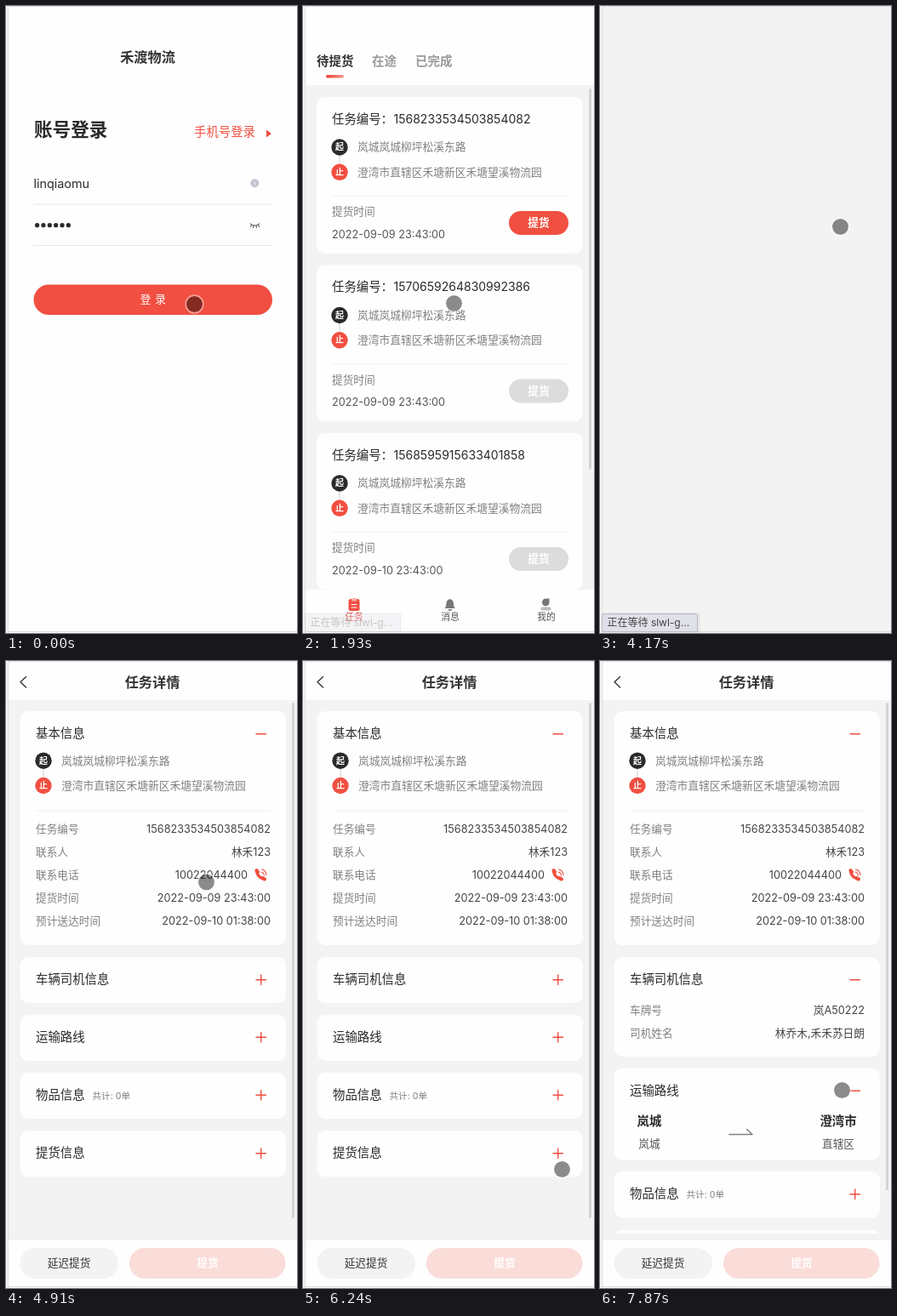
Write an HTML page that moves like this. It is 342 px wide and 737 px high and loops after 8000 ms.

```html
<!DOCTYPE html>
<html lang="zh-CN">
<head>
<meta charset="utf-8">
<style>
html, body { margin: 0; width: 100%; height: 100%; overflow: hidden; background: #fefefe; }
svg { display: block; }
text { font-family: Inter, 'Noto Sans CJK SC', 'Noto Sans CJK', sans-serif; white-space: pre; }
</style>
</head>
<body>
<svg id="stage" width="342" height="737" viewBox="0 0 342 737"></svg>
<script>
const RED = '#f04f41', INK = '#2a2a2a', GREY = '#808080', WHITE = '#fefefe', PAGE = '#f3f3f3';
const FROM = '岚城岚城柳坪松溪东路', TO = '澄湾市直辖区禾塘新区禾塘望溪物流园';

// y is the vertical middle of the glyphs
const text = (x, y, s, size = 12.7, fill = GREY, anchor = 'start', weight = 400) =>
  `<text x="${x}" y="${y + size * .345}" font-size="${size}" fill="${fill}" text-anchor="${anchor}" font-weight="${weight}">${s}</text>`;
const rect = (x, y, w, h, fill, r = 0) =>
  `<rect x="${x}" y="${y}" width="${w}" height="${h}" rx="${r}" fill="${fill}"/>`;
const dot = (x, y, r, fill) => `<circle cx="${x}" cy="${y}" r="${r}" fill="${fill}"/>`;
const line = (d, stroke, w = 1) =>
  `<path d="${d}" fill="none" stroke="${stroke}" stroke-width="${w}" stroke-linecap="round" stroke-linejoin="round"/>`;
const group = (id, s) => `<g id="${id}">${s}</g>`;

const stops = (x, y) =>
  rect(x - .5, y, 1, 29, '#ccc') +
  [['起', INK, FROM], ['止', RED, TO]].map(([mark, fill, place], i) =>
    dot(x, y + i * 29.3, 9.7, fill) +
    text(x, y + i * 29.3, mark, 10, '#fff', 'middle', 700) +
    text(x + 21, y + i * 29.3, place, 12.75)).join('');

function loginPage() {
  let s = rect(0, 0, 342, 737, WHITE) +
    text(166.5, 60, '禾渡物流', 16.2, '#333', 'middle', 700) +
    text(33, 146, '账号登录', 21.6, INK, 'start', 700) +
    text(221, 148.5, '手机号登录', 14.4, RED) +
    `<path d="M306 145.5L312 150L306 154.500Z" fill="${RED}"/>` +
    text(32.5, 209, 'linqiaomu', 14.4, INK) +
    dot(292.3, 208.3, 5, '#c3c4d0') +
    line('M290.8 206.8l3 3m0-3l-3 3', '#eee', .8) +
    rect(32, 232.5, 281, 1, '#e6e6e6') + rect(32, 281, 281, 1, '#e6e6e6') +
    line('M287 256q5.500 4.500 11 0M288.500 257.500l-1 2M291 258.500l-.5 2M294 258.500l.5 2M296.500 257.500l1 2', '#444', 1) +
    rect(32.5, 327.5, 280.5, 35.5, RED, 17.75) +
    text(164, 345, '登', 12.7, '#fff', 'middle') + text(181.5, 345, '录', 12.7, '#fff', 'middle');
  for (let i = 0; i < 6; i++) s += dot(36.6 + i * 7.35, 257.7, 2.6, INK);
  return s;
}

function taskCard(y, number, date, active) {
  return rect(16, y, 313, 184, WHITE, 10) +
    text(34, y + 26, '任务编号：', 14.4, INK) +
    text(106.5, y + 26, number, 14, INK) +
    stops(43, y + 59) +
    rect(34, y + 116, 278, 1, '#f1f1f1') +
    text(34, y + 135, '提货时间') +
    text(34, y + 161.5, date, 12.7, '#555') +
    rect(242, y + 134, 70, 28, active ? RED : '#dcdcdc', 14) +
    text(277, y + 148, '提货', 12.7, '#fff', 'middle', 700);
}

function listPage() {
  const tab = (x, label, fill) => text(x, 718.5, label, 10.8, fill, 'middle');
  return rect(0, 0, 342, 737, PAGE) + rect(0, 0, 342, 93, WHITE) +
    text(16, 65, '待提货', 14.5, '#333', 'start', 700) +
    text(81, 65, '在途', 14.5, '#999', 'start', 700) +
    text(132, 65, '已完成', 14.5, '#999', 'start', 700) +
    '<linearGradient id="fade"><stop stop-color="#ee3b32"/><stop offset="1" stop-color="#f79a8c"/></linearGradient>' +
    rect(27, 81, 21, 3.5, 'url(#fade)', 1.75) +
    taskCard(107, '1568233534503854082', '2022-09-09 23:43:00', true) +
    taskCard(304.5, '1570659264830992386', '2022-09-09 23:43:00') +
    taskCard(502, '1568595915633401858', '2022-09-10 23:43:00') +
    rect(336, 97, 3, 448, '#d3d3d3', 1.5) +
    rect(0, 686, 342, 51, WHITE) +
    rect(53.5, 697, 13, 14, RED, 2.5) + rect(57, 696, 6, 3.5, '#f9b5ad', 1) +
    line('M57 703.500h6M57 707h6', '#fff', 1.2) +
    '<path d="M166.500 708q2-2 2-6a4.200 4.700 0 0 1 8.400 0q0 4 2 6z" fill="#777"/>' +
    rect(170.500, 709, 4.500, 1.800, '#777', .9) +
    '<path d="M281 701a4.500 4.500 0 0 1 4.500-4.500h4v5a4.300 4.300 0 0 1-8.500 0z" fill="#777"/>' +
    rect(279.5, 706.5, 12, 4, '#bbb', 2) +
    tab(60, '任务', RED) + tab(173, '消息', '#555') + tab(286, '我的', '#555');
}

const row = (y, label, value, right = 311) =>
  text(35, y, label) + text(right, y, value, 12.7, '#444', 'end');

// A nested svg clips the body of a card to its current height
const panel = (id, y, h, title, body = '') =>
  `<svg id="${id}" y="${y}" width="342" height="${h}">
    <rect x="16.5" width="312.500" height="100%" rx="10" fill="${WHITE}"/>
    ${text(35, 26.3, title, 14.4, INK)}
    ${line('M294 26.700h11.500', RED, 1.4)}
    <g class="bar">${line('M299.750 20.950v11.500', RED, 1.4)}</g>${body}</svg>`;

function detailPage() {
  const city = (x, name, part) =>
    text(x, 63, name, 14.4, INK, 'middle', 700) + text(x, 89.5, part, 12.7, '#555', 'middle');
  const base = stops(44, 58.2) + rect(35, 116.5, 276, 1, '#f1f1f1') +
    row(139, '任务编号', '1568233534503854082') +
    row(166, '联系人', '林禾123') +
    row(193, '联系电话', '10022044400', 284) +
    row(220, '提货时间', '2022-09-09 23:43:00') +
    row(247, '预计送达时间', '2022-09-10 01:38:00') +
    line('M294.500 188q1 7 8.500 9.500', RED, 3.4) +
    line('M294.500 187l1.500 2M301.500 196l2.500 1.500', RED, 4) +
    line('M300 189q3 .5 3.500 4M300.500 186q5 1 5.500 6.500', RED, 1.1);
  return rect(0, 0, 342, 737, PAGE) + rect(0, 0, 342, 46, WHITE) +
    line('M23.500 18.500l-6.500 6.200l6.500 6.200', '#333', 1.4) +
    text(172, 25, '任务详情', 16.2, '#333', 'middle', 700) +
    '<svg width="342" height="673">' +
    panel('base', 59, 275, '基本信息', base) +
    panel('driver', 348, 54, '车辆司机信息',
      row(63, '车牌号', '岚A50222') + row(90, '司机姓名', '林乔木,禾禾苏日朗')) +
    panel('route', 415.5, 54.5, '运输路线',
      city(58, '岚城', '岚城') + city(280, '澄湾市', '直辖区') +
      line('M152 78h27l-6.500-6', GREY, 1.5)) +
    panel('goods', 483.5, 54.5, '物品信息', text(101.5, 27.5, '共计: 0单', 10.6)) +
    panel('pickup', 552, 54.5, '提货信息') +
    '</svg>' +
    `<rect id="scroll" x="336" y="49" width="3" height="606" rx="1.5" fill="#d3d3d3"/>` +
    rect(0, 681, 342, 56, WHITE) +
    rect(16.5, 690, 115.5, 36, PAGE, 18) + text(74, 708, '延迟提货', 12.7, '#333', 'middle') +
    rect(145, 690, 183.5, 36, '#fadcd8', 18) + text(237, 708, '提货', 12.7, '#fff', 'middle', 700);
}

const stage = document.getElementById('stage');
stage.innerHTML =
  group('login', loginPage()) + group('list', listPage()) +
  group('blank', rect(0, 0, 342, 737, PAGE)) + group('detail', detailPage()) +
  rect(0, 0, 2, 737, '#f6f6f6') + rect(2, 0, 1, 737, '#dedede') +
  rect(2, 0, 340, 1, '#dedede') + rect(2, 735, 340, 1, '#dadada') +
  group('status',
    rect(1, 713, 117, 24, 'rgba(0,0,0,.05)', 4) +
    rect(2, 714, 113, 22, '#b9bac2', 3) + rect(3, 715, 111, 20, '#dfe0e8', 2) +
    text(8.5, 725, '正在等待 slwl-g...', 12, '#444')) +
  group('cursor', dot(0, 0, 9.5, 'rgba(0,0,0,.45)') +
    '<circle r="10.300" fill="none" stroke="#fff" stroke-opacity=".45" stroke-width="1.700"/>');

const $ = id => document.getElementById(id);

// Each track lists [start time, ...values], held until the next entry
const pages = [[0, 'login'], [1780, 'list'], [4170, 'blank'], [4320, 'detail']];
const status = [[0, 0], [1630, 1], [1930, .3], [2080, 0], [4170, 1], [4460, .3], [4610, 0]];
const driverOpen = [[0, 0], [6990, .7], [7130, 1]];
const routeOpen = [[0, 0], [7580, .7], [7730, 1]];
const cursor = [
  [0, 221.5, 350.5], [290, 229, 352], [440, 241, 355], [590, 246, 357],
  [1190, 236, 355], [1340, 200, 351], [1480, 179.5, 350.5], [1630, 177.5, 349.5],
  [2530, 186, 341], [2680, 225, 303], [2820, 268, 269], [2970, 282.5, 259.5],
  [4610, 268, 260], [4760, 243, 260], [4910, 235.5, 260],
  [5210, 205, 225], [5360, 145, 168], [5510, 122, 155], [5650, 140, 210],
  [5800, 200, 360], [5950, 262, 505], [6100, 297, 585], [6240, 304.5, 597.5],
  [6390, 308, 550], [6540, 311, 460], [6690, 304, 400], [6840, 300, 382],
  [7130, 300, 425], [7280, 298, 485], [7430, 296, 502],
  [7730, 288, 504], [7870, 284.5, 504.5]
];
const at = (track, t) => track.findLast(k => k[0] <= t).slice(1);

function setPanel(id, y, h, open) {
  const p = $(id);
  p.setAttribute('y', y);
  p.setAttribute('height', h);
  p.querySelector('.bar').style.display = open ? 'none' : '';
}

function draw(now) {
  const t = now % 8000;
  const [page] = at(pages, t), [d] = at(driverOpen, t), [r] = at(routeOpen, t);
  const [x, y] = at(cursor, t);
  for (const [, id] of pages) $(id).style.display = id === page ? '' : 'none';
  $('status').style.opacity = at(status, t)[0];
  const dy = d * 63, ry = dy + r * 53.5;
  setPanel('base', 59, 275, true);
  setPanel('driver', 348, 54 + dy, d);
  setPanel('route', 415.5 + dy, 54.5 + r * 53.5, r);
  setPanel('goods', 483.5 + ry, 54.5);
  setPanel('pickup', 552 + ry, 54.5);
  $('scroll').setAttribute('height', 606 - r * 33);
  $('cursor').setAttribute('transform', `translate(${x} ${y})`);
  requestAnimationFrame(draw);
}
draw(0);
</script>
</body>
</html>
```
